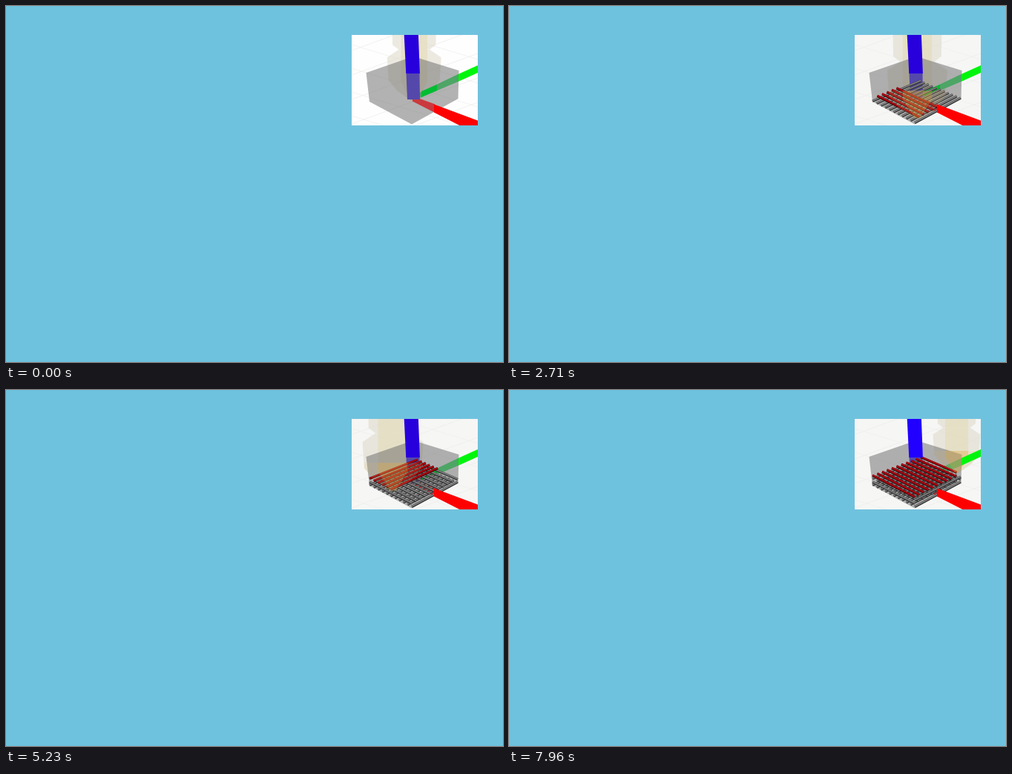
Recreate the animation shown at these times as an HTML page with a canvas. Size 670 by 480 pixels, loop 8000 ms.

```html
<!DOCTYPE html>
<html lang="en">
<head>
<meta charset="utf-8">
<title>Layered printing</title>
<style>
html, body { margin: 0; width: 100%; height: 100%; overflow: hidden; background: #6fc2de; }
canvas { display: block; }
</style>
</head>
<body>
<canvas id="stage" width="670" height="480"></canvas>
<script>
const ctx = document.getElementById('stage').getContext('2d');
const LOOP = 8000, STEP = 70, LAYERS = 4, LINES = 11, LINE_TIME = 150;
const LEFT = [490, 128.3], BACK = [555, 101], FRONT = [547, 157.5], RIGHT = [609, 124];

const mix = (a, b, f) => a + (b - a) * f;
const mixPoint = (a, b, f) => a.map((v, i) => mix(v, b[i], f));
const clamp = f => Math.max(0, Math.min(1, f));

function poly(color, ...points) {
  ctx.fillStyle = color;
  ctx.beginPath();
  points.forEach(([x, y]) => ctx.lineTo(x, y));
  ctx.fill();
}

function stroke([x1, y1], [x2, y2], color, width, dy = 0) {
  ctx.strokeStyle = color;
  ctx.lineWidth = width;
  ctx.beginPath();
  ctx.moveTo(x1, y1 + dy);
  ctx.lineTo(x2, y2 + dy);
  ctx.stroke();
}

// Tapered bar; its width is measured across x or across y
function beam(color, [x1, y1], [x2, y2], w1, w2, upright = false) {
  const edge = (x, y, w) => upright ? [x + w / 2, y] : [x, y + w / 2];
  poly(color, edge(x1, y1, -w1), edge(x2, y2, -w2), edge(x2, y2, w2), edge(x1, y1, w1));
}

// Bed position: u runs left to back, v left to front, layer upwards
function project([u, v, layer]) {
  const [x, y] = mixPoint(mixPoint(LEFT, BACK, u), mixPoint(FRONT, RIGHT, u), v);
  return [x, y - (layer - 1) * mix(4.4, 3.5, u)];
}

// Even layers run crosswise, fill from the middle to one side, then jump back
const isEven = layer => layer % 2 === 0;
const lineIndex = (layer, n) => isEven(layer) && n < 6 ? 5 - n : n;
const jumpTime = layer => isEven(layer) ? 500 / layer : 0;
const layerStart = layer => 70 + (isEven(layer) ? 1880 : 0) + Math.floor((layer - 1) / 2) * 4248;
const lineStart = (layer, n) =>
  layerStart(layer) + n * LINE_TIME + (n >= 6 ? jumpTime(layer) : 0);
const layerEnd = layer => lineStart(layer, LINES - 1) + LINE_TIME;

function lineEnds(layer, n) {
  const offset = lineIndex(layer, n) / (LINES - 1);
  const at = f => isEven(layer) ? [offset, f, layer] : [f, offset, layer];
  return n % 2 ? [at(1), at(0)] : [at(0), at(1)];
}

const drawnPart = (layer, n, t) =>
  clamp(((t - lineStart(layer, n)) / LINE_TIME - 0.15) / 0.85);

const travel = (from, to, t, t0, t1) => mixPoint(from, to, clamp((t - t0) / (t1 - t0)));

function headAt(layer, t) {
  if (layer === 0) return [0.5, 0.5, 1];
  let n = LINES - 1;
  while (n > 0 && t < lineStart(layer, n)) n--;
  const [a, b] = lineEnds(layer, n);
  if (t > layerEnd(layer) && layer < LAYERS)
    return travel(b, [0, 0, layer + 1], t, layerEnd(layer), layerStart(layer + 1));
  const finished = lineStart(layer, n) + LINE_TIME;
  if (n < LINES - 1 && t > finished)
    return travel(b, lineEnds(layer, n + 1)[0], t, finished, lineStart(layer, n + 1));
  const part = drawnPart(layer, n, t);
  if (part || n === 0) return mixPoint(a, b, part);
  const from = n === 6 && isEven(layer) ? a : lineEnds(layer, n - 1)[1];
  return travel(from, a, t, lineStart(layer, n), lineStart(layer, n) + 0.15 * LINE_TIME);
}

function drawFloor(color) {
  ctx.fillStyle = color;
  ctx.fillRect(466, 39, 170, 122);
  for (let i = 0; i < 6; i++) {
    stroke([466, 60 + i * 33], [636, -2 + i * 33], '#ebebea', 0.7);
    stroke([466, -12 + i * 32], [636, 40 + i * 32], '#eeeeed', 0.7);
  }
}

function drawBox() {
  poly('rgba(105,105,105,.5)', [485.5, 90], [549, 68], [610.5, 87],
    [609.5, 125], [547, 159.5], [490, 129]);
}

function drawInnerAxes() {
  beam('#4da566', [555, 121.5], [610, 96.8], 7, 10);
  beam('#00bd32', [560, 119], [581, 110], 8, 8);
  beam('#ca393e', [548, 125], [578, 138], 7, 11.5);
  beam('#5548ab', [548.5, 90], [549.5, 126], 18, 17, true);
}

function drawOuterAxes(blueCovered) {
  beam('#00f50c', [610, 96.8], [640, 83.2], 10, 10);
  beam('#ff0000', [577, 138], [636, 164], 11, 19);
  beam(blueCovered ? '#2800dc' : '#2100ff', [546.3, 39], [548.6, 91], 19.2, 18.6, true);
}

function drawLayer(layer, t, active) {
  const lines = [...Array(LINES).keys()];
  if (isEven(layer)) lines.sort((a, b) => lineIndex(layer, b) - lineIndex(layer, a));
  for (const n of lines) {
    const part = drawnPart(layer, n, t);
    if (!part) continue;
    const [start, end] = lineEnds(layer, n);
    const a = project(start), b = project(mixPoint(start, end, part));
    stroke(a, b, active ? '#50040a' : '#333333', 3.3);
    stroke(a, b, active ? '#b8060f' : '#808080', 1.7, -0.5);
  }
}

// Symmetric outline around the nozzle axis, given as half width and height
function turned(color, head, ...profile) {
  const [x, y] = project(head), scale = (41 - 9 * head[0]) / 35;
  const side = k => profile.map(([w, h]) => [x + k * w * scale, y - h * scale]);
  poly(color, ...side(-1), ...side(1).reverse());
}

function drawNozzle(head) {
  const shell = 'rgba(220,215,195,.5)';
  turned(shell, head, [29, 130], [28, 72], [20, 66]);
  turned(shell, head, [20, 66], [35, 56], [33, 26], [22, 13], [4, 0]);
  turned('rgba(224,211,168,.42)', head, [17, 130], [17, 25], [4, 0]);
}

function drawTip(head) {
  turned('rgba(222,186,110,.16)', head, [33, 32], [33, 26], [22, 13], [4, 0]);
  turned('rgba(226,166,60,.28)', head, [17, 32], [17, 22], [3, 0]);
}

function draw(t) {
  let layer = LAYERS;
  while (layer > 0 && t < layerStart(layer)) layer--;
  const head = headAt(layer, t);
  ctx.fillStyle = '#6fc2de';
  ctx.fillRect(0, 0, 670, 480);
  ctx.save();
  ctx.beginPath();
  ctx.rect(466, 39, 170, 122);
  ctx.clip();
  drawFloor(layer ? '#f6f6f5' : '#fefefe');
  drawNozzle(head);
  drawBox();
  drawInnerAxes();
  for (let k = 1; k <= layer; k++) drawLayer(k, t, k === layer);
  if (layer) drawTip(head);
  drawOuterAxes(Math.abs(project(head)[0] - 547) < 34);
  ctx.restore();
}

function tick(now) {
  const t = now % LOOP;
  draw(Math.max(0, Math.floor((t - 50) / STEP) * STEP + 50));
  requestAnimationFrame(tick);
}
tick(performance.now());
</script>
</body>
</html>
```
